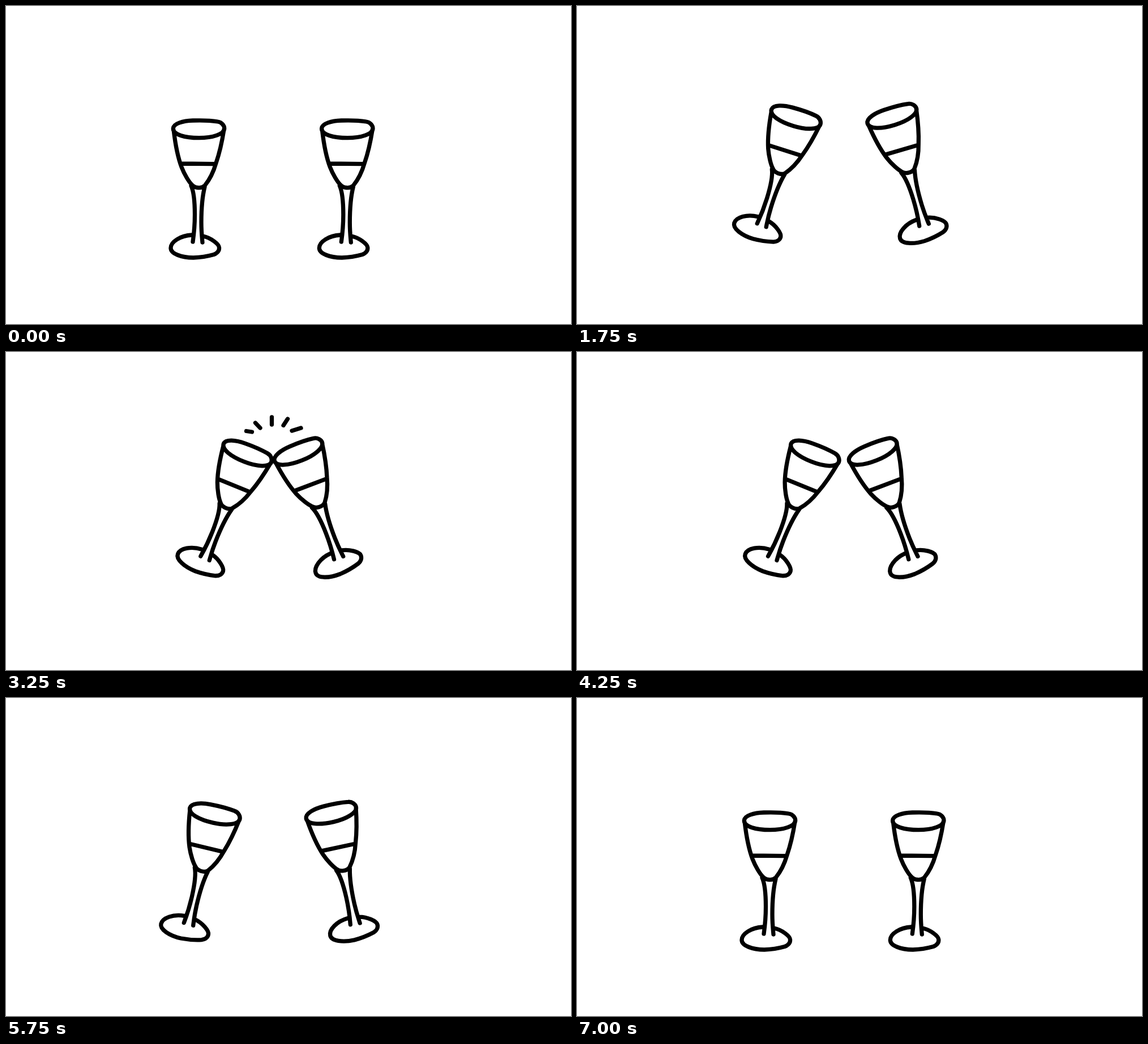
An HTML page with a canvas for the animation above (7.25 s loop, 998x561 px).

```html
<!DOCTYPE html>
<html lang="en">
<head>
<meta charset="utf-8">
<title>Clinking glasses</title>
<style>
html, body { margin: 0; width: 100%; height: 100%; overflow: hidden; background: #fff; }
canvas { display: block; }
</style>
</head>
<body>
<canvas id="stage" width="998" height="561"></canvas>
<script>
const ctx = document.getElementById('stage').getContext('2d');
const LOOP = 7250, STEP = 250;
const PIVOT = { x: 337.5, y: 321 };
const GAP = 262.3;

const glass = new Path2D([
  // rim
  'M295.3 216C296 207 313 202.5 330 202C345 201.5 362 202 374 204',
  'C381 205 385.7 211 385.7 216C385.7 226 365 232.7 341 232.7',
  'C316 232.7 295 227 295.3 216Z',
  // bowl
  'M296.3 220C299 243 304 268 310 284C315 297 323 310 328 315',
  'C333 321.5 345 322.5 351 317C360 306 367 291 371 277C378 257 382 237 385 218',
  // drink
  'M309 278L368 278.7',
  // stem
  'M327 317C332 328 333.5 350 333.5 368C333.5 388 332 402 330 416',
  'M351 319C347 335 345 362 345 382C345 398 346 406 347 417',
  // foot
  'M328 404C308 405 291 416 291 427C291 437 310 444 331 444',
  'C346 443.5 358 441 367 438.5C374 436 377 431 376.5 426C376 420 362 409 348 406'
].join(''));

const sparks = new Path2D(
  'M424.5 139.5L434.5 141M440.5 125L449 134M469.5 115V128M497.5 118L490 129.5M521 134L505 139');

// Pose: [inward shift, lift, tilt in degrees]
const rest = [0, 0, 0], lifted = [0, 10.5, 0], tipped = [0, 10.5, 7.2];
const leaning = [0, 10.5, 12.8], closer = [5.2, 15.5, 12.8], nearing = [10.5, 20.7, 15];
const mid = [15.7, 25.9, 17], apart = [41.7, 46.4, 21.4], touch = [48, 46.4, 21.4];

const glide = (a, b, n) => Array.from({ length: n }, (_, i) =>
  a.map((v, k) => v + (b[k] - v) * (i + 1) / n));

// One pose per step
const poses = [
  rest, lifted, lifted, tipped, leaning, closer, nearing, mid,
  ...glide(mid, apart, 5),
  touch, touch, touch, touch, apart,
  ...glide(apart, [15.7, 25, 17], 5),
  closer, leaning, tipped, lifted, lifted, rest
];
const sparkTimes = [3250, 3750];

function drawGlass(x, y, tilt) {
  ctx.save();
  ctx.translate(x, y);
  ctx.rotate(tilt * Math.PI / 180);
  ctx.translate(-PIVOT.x, -PIVOT.y);
  ctx.stroke(glass);
  ctx.restore();
}

function draw(now) {
  const step = Math.floor((now % LOOP) / STEP);
  const [shift, lift, tilt] = poses[step];
  ctx.fillStyle = '#fff';
  ctx.fillRect(0, 0, 998, 561);
  ctx.strokeStyle = '#000';
  ctx.lineWidth = 7.3;
  ctx.lineCap = ctx.lineJoin = 'round';
  drawGlass(PIVOT.x + shift, PIVOT.y - lift, tilt);
  drawGlass(PIVOT.x + GAP - shift, PIVOT.y - lift, -tilt);
  if (sparkTimes.includes(step * STEP)) ctx.stroke(sparks);
}

const start = performance.now();
function tick() {
  draw(performance.now() - start);
  requestAnimationFrame(tick);
}
tick();
</script>
</body>
</html>
```
